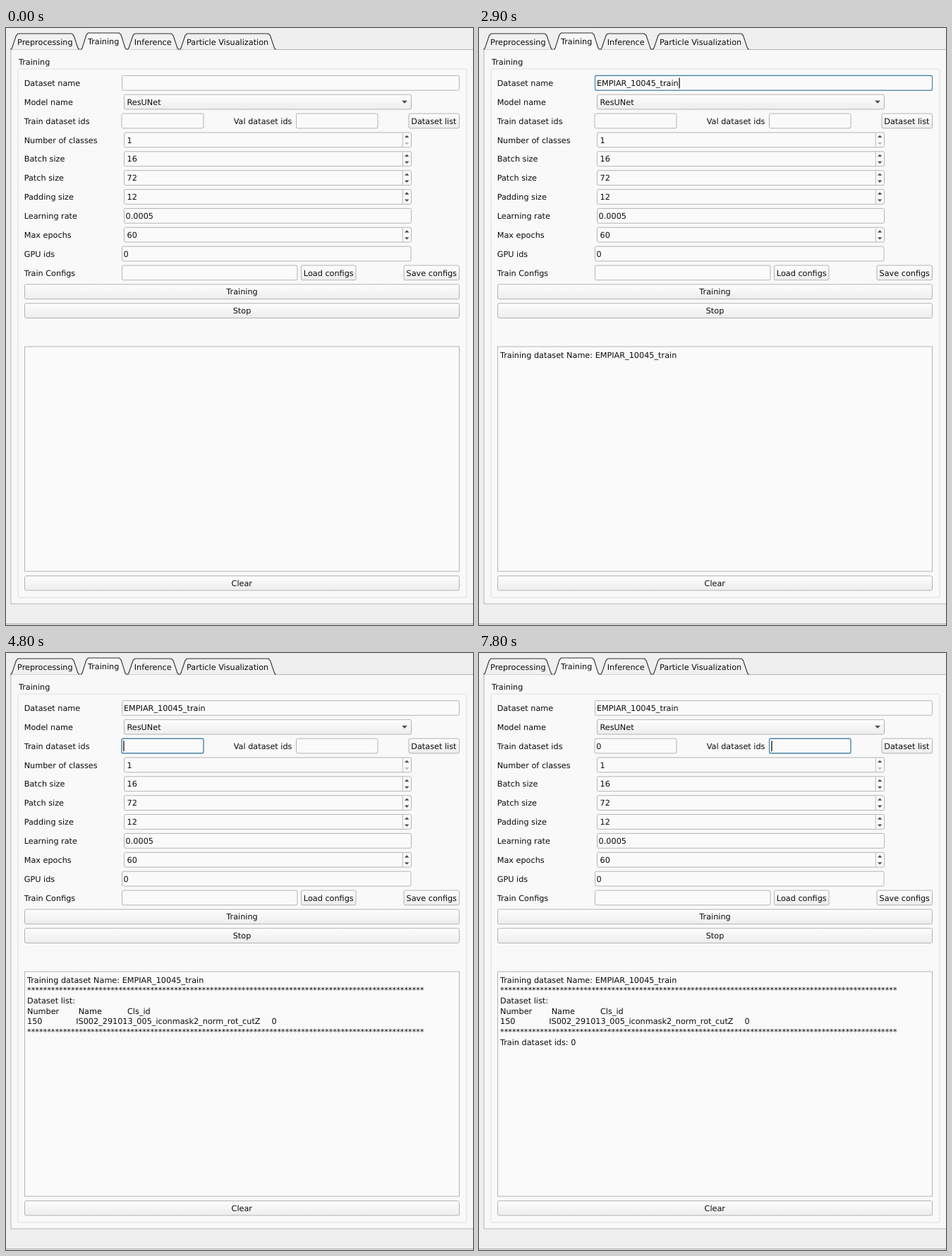
These frames come from a looping animation (662x845 px, 8 s). An HTML page:

```html
<!DOCTYPE html>
<html lang="en">
<head>
<meta charset="utf-8">
<title>Training panel</title>
<style>
html, body { margin: 0; width: 100%; height: 100%; overflow: hidden; background: #efefef; }
svg { display: block; width: 662px; height: 845px; }
text { font: 11.25px "DejaVu Sans", sans-serif; fill: #0c0c0c; text-rendering: geometricPrecision; white-space: pre; }
.mid { text-anchor: middle; }
.box { fill: #fafafa; stroke: #b5b5b5; }
.btn { fill: url(#face); stroke: #b3b3b3; }
.ring { fill: none; stroke: #3a7da8; stroke-width: 1.1; }
.caret { fill: #111; }
.tab { fill: #f1f1f1; stroke: #303030; stroke-width: 1.1; }
.tab.on { fill: #f8f8f8; }
.arrow { fill: #4a4a4a; }
.arrow.off { fill: #b9b9b9; }
.press { fill: #dadada; stroke: #b0b0b0; }

[class*="a-"] { opacity: 0; animation: 8s step-end infinite; }
.a-ring1 { animation-name: ring1; }
.a-caret1 { animation-name: caret1; }
.a-name { animation-name: name; }
.a-caret2 { animation-name: caret2; }
.a-press { animation-name: press; }
.a-list { animation-name: list; }
.a-ring2 { animation-name: ring2; }
.a-caret3 { animation-name: caret3; }
.a-zero { animation-name: zero; }
.a-caret4 { animation-name: caret4; }
.a-ids { animation-name: ids; }
.a-ring3 { animation-name: ring3; }
.a-caret5 { animation-name: caret5; }
.hover { animation: hover 8s step-end infinite; }

@keyframes ring1 { 0%, 41.25% { opacity: 0 } 12.5% { opacity: 1 } }
@keyframes caret1 { 0%, 17.5% { opacity: 0 } 12.5% { opacity: 1 } }
@keyframes name { 0% { opacity: 0 } 22.5%, 100% { opacity: 1 } }
@keyframes caret2 { 0%, 30%, 41.25% { opacity: 0 } 22.5%, 36.25% { opacity: 1 } }
@keyframes hover { 0%, 50% { fill: #0c0c0c } 37.5% { fill: #1010ff } }
@keyframes press { 0%, 43.75% { opacity: 0 } 41.25% { opacity: 1 } }
@keyframes list { 0% { opacity: 0 } 43.75%, 100% { opacity: 1 } }
@keyframes ring2 { 0%, 86.25% { opacity: 0 } 60% { opacity: 1 } }
@keyframes caret3 { 0%, 65% { opacity: 0 } 60% { opacity: 1 } }
@keyframes zero { 0% { opacity: 0 } 70%, 100% { opacity: 1 } }
@keyframes caret4 { 0%, 77.5%, 86.25% { opacity: 0 } 70%, 82.5% { opacity: 1 } }
@keyframes ids { 0% { opacity: 0 } 71.25%, 100% { opacity: 1 } }
@keyframes ring3 { 0% { opacity: 0 } 86.25%, 100% { opacity: 1 } }
@keyframes caret5 { 0%, 92.5% { opacity: 0 } 86.25%, 97.5%, 100% { opacity: 1 } }
</style>
</head>
<body>
<svg id="stage" viewBox="0 0 662 845" xmlns="http://www.w3.org/2000/svg"></svg>
<script>
const rowY = i => 77.8 + i * 26.86;
const text = (x, y, s, cls = '') => `<text x="${x}" y="${y}" class="${cls}">${s}</text>`;
const rect = (x1, y1, x2, y2, cls, r = 2) =>
  `<rect x="${x1}" y="${y1}" width="${x2 - x1}" height="${y2 - y1}" rx="${r}" class="${cls}"/>`;
const line = (d, color) => `<path d="${d}" fill="none" stroke="${color}"/>`;

// Widgets centred on a form row
const onRow = (i, x1, x2, cls) => rect(x1 + 0.5, rowY(i) - 10.4, x2 + 0.5, rowY(i) + 10.4, cls);
const rowText = (i, x, s, cls) => text(x, (rowY(i) + 4.1).toFixed(1), s, cls);
const field = (i, x1, x2, s = '', tx = x1 + 2.6) => onRow(i, x1, x2, 'box') + rowText(i, tx, s);
const button = (i, x1, x2, s, cls = '') =>
  onRow(i, x1, x2, 'btn') + rowText(i, (x1 + x2 + 1) / 2, s, 'mid ' + cls);
const caret = (i, x, cls) =>
  `<rect x="${x}" y="${(rowY(i) - 7.3).toFixed(1)}" width="1.3" height="15" class="caret ${cls}"/>`;
const arrow = (x, y, w, h, cls = '') =>
  `<path d="M${x - w} ${y}h${2 * w}l${-w} ${h}z" class="arrow ${cls}"/>`;

function spin(i, s, low) {
  const y = rowY(i);
  return field(i, 167, 574, s, 171.5)
    + line(`M562.3 ${y - 10}V${y + 10}`, '#bcbcbc')
    + arrow(568.2, y - 3.3, 3.2, -3.3) + arrow(568.2, y + 3.5, 3.2, 3.3, low ? 'off' : '');
}

function tab(x1, x2, top, s, tx, cls = '') {
  return `<path class="tab ${cls}" d="M${x1} 30.5L${x1 + 2} 28.5L${x1 + 8} ${top + 2.5}`
    + `L${x1 + 10.5} ${top}H${x2 - 10.5}L${x2 - 8} ${top + 2.5}L${x2 - 2} 28.5L${x2} 30.5"/>`
    + text(tx, top + 16, s);
}

const logY = i => (466.5 + i * 14.67).toFixed(1);
const log = (i, s, x = 30) => text(x, logY(i), s);
const group = (cls, ...parts) => `<g class="${cls}">${parts.join('')}</g>`;
const stars = '*'.repeat(100);

const labels = ['Dataset name', 'Model name', 'Train dataset ids', 'Number of classes', 'Batch size',
  'Patch size', 'Padding size', 'Learning rate', 'Max epochs', 'GPU ids', 'Train Configs'];

const panel = [
  `<defs><linearGradient id="face" x2="0" y2="1"><stop stop-color="#fdfdfd"/>
   <stop offset="1" stop-color="#ededed"/></linearGradient></defs>`,
  '<rect width="662" height="845" fill="#efefef"/>',
  '<rect x="7" y="30" width="655" height="785" fill="#f8f8f8"/>',
  line('M662 30.5H7V815H662', '#b4b4b4'),
  line('M0 843.5H662', '#a6a6a6'),
  tab(6.5, 104, 8, 'Preprocessing', 16.1),
  tab(172, 245, 8, 'Inference', 181.8),
  tab(246, 382.5, 8, 'Particle Visualization', 256),
  tab(106, 171, 7, 'Training', 116, 'on'),
  '<rect x="108" y="30" width="62" height="2" fill="#f8f8f8"/>',
  text(18, 52.2, 'Training'),
  '<rect x="17" y="58" width="636" height="748" rx="2" fill="#f9f9f9" stroke="#dedede"/>',
  ...labels.map((s, i) => rowText(i, 25.7, s)),
  field(0, 164, 642),
  onRow(1, 167, 574, 'btn'), rowText(1, 171.5, 'ResUNet'), arrow(565, rowY(1) - 1.8, 3.9, 3.9),
  field(2, 163.5, 279.5), rowText(2, 322.8, 'Val dataset ids'), field(2, 411, 526.5),
  button(2, 570.5, 642, ''),
  spin(3, '1', true), spin(4, '16'), spin(5, '72'), spin(6, '12'),
  field(7, 167, 574, '0.0005'),
  spin(8, '60'),
  field(9, 164, 573.5, '0'),
  field(10, 164, 412.5),
  button(10, 418, 495.5, 'Load configs'), button(10, 563.5, 642, 'Save configs'),
  button(11, 26, 642, 'Training'), button(12, 26, 642, 'Stop'),
  rect(26.5, 451, 642.5, 769, 'box', 0),
  rect(26.5, 775.5, 642.5, 796, 'btn'), text(334.3, 789.7, 'Clear', 'mid')
];

const action = [
  onRow(0, 164, 642, 'ring a-ring1'),
  caret(0, 167.3, 'a-caret1'), caret(0, 283.4, 'a-caret2'),
  group('a-name', rowText(0, 167, 'EMPIAR_10045_train'),
    log(0, 'Training dataset Name: EMPIAR_10045_train')),
  onRow(2, 570.5, 642, 'press a-press'),
  rowText(2, 606.4, 'Dataset list', 'mid hover'),
  group('a-list', log(1, stars), log(2, 'Dataset list:'),
    log(3, 'Number'), log(3, 'Name', 102.7), log(3, 'Cls_id', 172),
    log(4, '150'), log(4, 'IS002_291013_005_iconmask2_norm_rot_cutZ', 99.2), log(4, '0', 376.5),
    log(5, stars)),
  onRow(2, 163.5, 279.5, 'ring a-ring2'),
  caret(2, 166.3, 'a-caret3'), caret(2, 173.4, 'a-caret4'),
  group('a-zero', rowText(2, 166.3, '0')),
  group('a-ids', log(6, 'Train dataset ids: 0')),
  onRow(2, 411, 526.5, 'ring a-ring3'),
  caret(2, 414.3, 'a-caret5')
];

document.getElementById('stage').innerHTML = panel.concat(action).join('');
</script>
</body>
</html>
```
